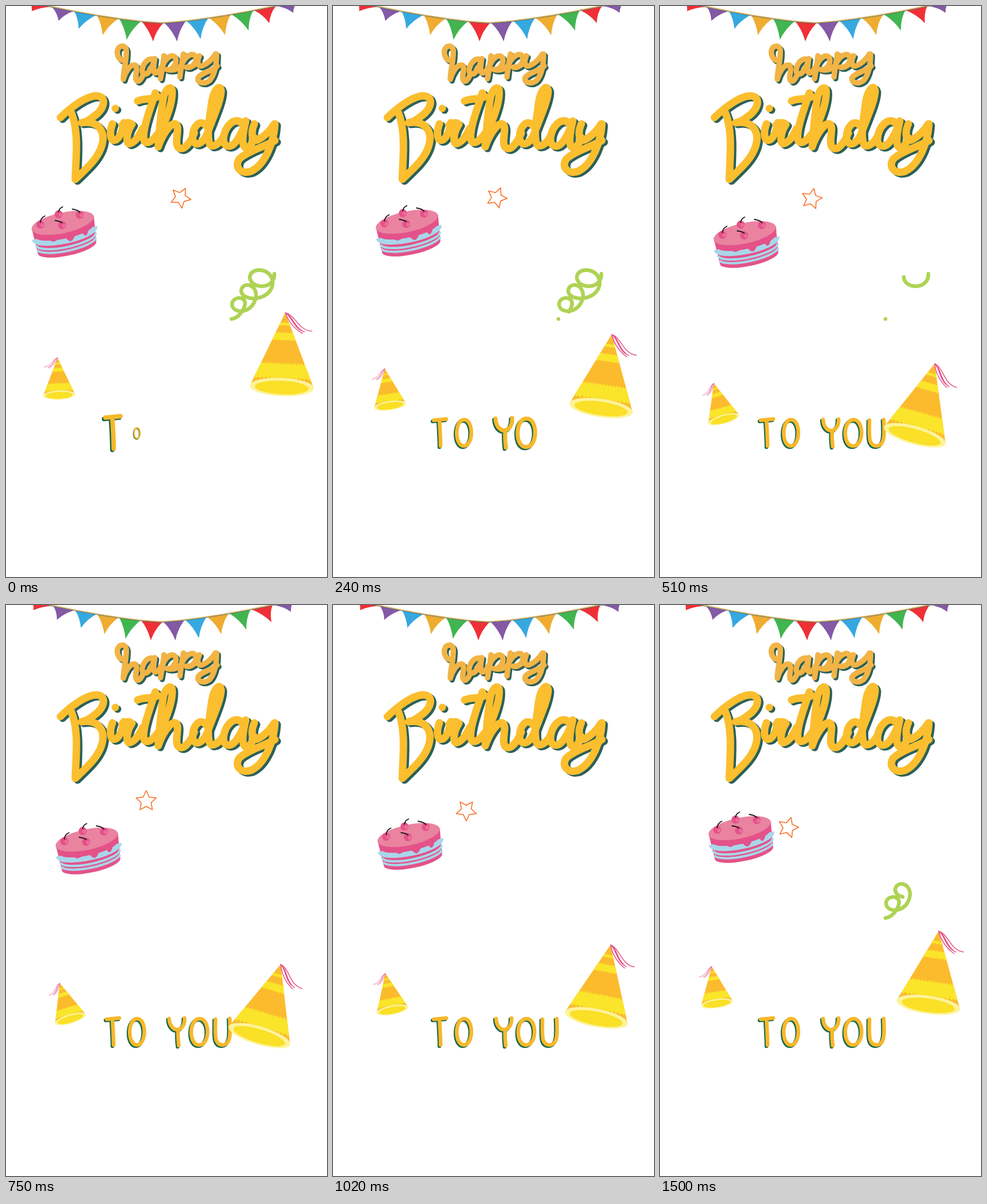
Write an HTML page that moves like this. It is 561 px wide and 998 px high and loops after 1530 ms.

```html
<!DOCTYPE html>
<html lang="en">
<head>
<meta charset="utf-8">
<title>Birthday card</title>
<style>
html, body { margin: 0; width: 100%; height: 100%; overflow: hidden; background: #fff; }
svg { display: block; width: 100vw; height: 100vh; }
.ink { fill: none; stroke-linecap: round; stroke-linejoin: round; }
</style>
</head>
<body>
<svg viewBox="0 0 561 998" role="img" aria-label="Happy Birthday to you">
  <defs>
    <path id="happy" d="M207 95C198 96 193 86 195 77C198 68 208 68 210 76C212 90 205 112 205 128C208 117 216 103 224 103C234 104 222 127 229 131C233 133 237 126 240 120
      M258 95C252 88 240 98 238 111C237 122 246 121 252 112C256 105 260 95 260 92C258 104 256 118 262 117C268 115 271 108 274 103
      M276 87C275 100 272 116 270 127M274 104C278 92 290 82 296 90C300 100 290 114 281 111C292 114 301 110 307 103
      M310 84C308 98 305 112 304 124M308 100C314 88 326 80 331 88C335 98 325 110 315 107C324 108 331 102 335 97
      M338 87C333 98 335 108 344 104C353 100 361 92 366 84M368 84C368 100 366 118 356 130C348 138 332 134 336 125C342 116 360 114 369 105"/>
    <path id="birthday" d="M95 195C112 178 140 157 158 157C178 158 172 182 152 194C146 199 138 203 132 204C160 199 174 218 168 242C162 266 140 285 121 303M114 186C128 220 122 265 121 303
      M186 206C180 222 182 238 192 234C200 230 204 214 206 204M191 179L191 179
      M203 208C208 203 216 203 220 207C210 222 208 245 218 240C228 236 234 224 239 214
      M261 152C252 180 238 215 241 234C245 244 257 236 266 222M230 166C242 160 256 165 265 158
      M268 222C280 200 293 165 290 146C286 138 278 148 275 160C270 190 268 220 266 246C272 228 286 204 296 206C306 210 292 240 302 248C312 254 324 235 329 222
      M350 210C340 196 326 210 326 230C328 250 346 240 352 222C362 195 376 165 376 148C374 136 364 145 360 165C356 195 350 225 356 241C360 250 374 240 380 228
      M412 205C400 192 382 210 380 232C380 250 396 248 404 234C412 222 416 212 419 201C414 222 410 246 420 248C427 247 431 238 434 230
      M434 206C427 222 430 238 440 234C452 228 462 217 469 206M470 206C468 240 452 278 428 289C410 295 398 281 408 267C425 252 455 245 470 235"/>
    <g id="hat">
      <path d="M0 0L55 128A55 16 0 0 1 -55 128Z" fill="#fbbb2d"/>
      <g id="bands" fill="#fae52a"></g>
      <ellipse cy="130" rx="56" ry="16" fill="#fdf39b"/>
      <ellipse cy="131" rx="47" ry="12" fill="#fae026"/>
      <g class="ink" stroke="#e4558b" stroke-width="1.5">
        <path d="M0 0C18 3 24 30 48 30M0 0C12 6 16 28 35 32M0 0C5 12 14 26 32 35M0 0C14 6 16 22 29 29"/>
      </g>
    </g>
  </defs>

  <g id="bunting"></g>
  <use href="#happy" class="ink" x="3" y="3" stroke="#2b6159" stroke-width="9.5"/>
  <use href="#happy" class="ink" stroke="#f2b445" stroke-width="9.5"/>
  <use href="#birthday" class="ink" x="4" y="3" stroke="#2b6159" stroke-width="13"/>
  <use href="#birthday" class="ink" stroke="#fbbe2e" stroke-width="13"/>

  <g id="cake">
    <g transform="rotate(-12)">
      <path d="M-53.5 -16L-52 28A52 14 0 0 0 52 28L57 -16Z" fill="#e45289"/>
      <g fill="none" stroke="#a9d6ea">
        <path d="M-53 2A53 14 0 0 0 55 2" stroke-width="9"/>
        <path d="M-52 13A53 14 0 0 0 54 13M-52 21.5A53 14 0 0 0 53 21.5" stroke-width="4"/>
      </g>
      <path d="M-53 -4Q-47 4 -40 3T-27 9T-12 10T3 14T18 10T32 9T45 1T56 -6L57 -16H-53Z" fill="#e45289"/>
      <ellipse cx="1.5" cy="-16" rx="55.5" ry="18" fill="#e9839f"/>
    </g>
    <g id="cherries"></g>
  </g>

  <path id="star" class="ink" stroke="#f9681c" stroke-width="1.5"/>
  <path id="curl" class="ink" pathLength="100" stroke="#aed354" stroke-width="6.5" d="M394 547C406 546 417 531 418 519C416 506 395 508 395 522C397 540 434 538 437 506C437 484 412 482 411 498C413 518 462 516 466 486C468 458 428 454 426 474C428 496 470 496 469 468"/>
  <g id="words" class="ink" stroke-width="6.5"></g>
  <use id="smallHat" href="#hat"/>
  <use id="bigHat" href="#hat"/>
</svg>
<script>
const LOOP = 1530, STEP = 30;
const KEYS = [0, 240, 510, 750, 1020, 1260, 1500];
const $ = id => document.getElementById(id);

function add(parent, tag, attrs) {
  const el = document.createElementNS('http://www.w3.org/2000/svg', tag);
  for (const k in attrs) el.setAttribute(k, attrs[k]);
  return parent.appendChild(el);
}

// Smooth curve through the values at KEYS
function curve(v, t) {
  let i = 0;
  while (i < KEYS.length - 2 && t >= KEYS[i + 1]) i++;
  const slope = j => {
    const a = Math.max(j - 1, 0), b = Math.min(j + 1, KEYS.length - 1);
    return (v[b] - v[a]) / (KEYS[b] - KEYS[a]);
  };
  const h = KEYS[i + 1] - KEYS[i], u = (t - KEYS[i]) / h, w = 1 - u;
  return v[i] * (1 + 2 * u) * w * w + v[i + 1] * u * u * (3 - 2 * u)
    + h * u * w * (slope(i) * w - slope(i + 1) * u);
}

const inOut = u => {
  u = Math.min(1, Math.max(0, u));
  return u < .5 ? 4 * u ** 3 : 1 - 4 * (1 - u) ** 3;
};

const MOVES = {
  cakeX: [101, 131, 150, 143, 134, 136, 141],
  cakeY: [395, 393, 413, 426, 418, 415, 406],
  starX: [305, 286, 265, 245, 233, 228, 224],
  starY: [335, 335, 337, 343, 359, 374, 389],
  starTurn: [-62, -68, -77, -90, -126, -140, -146],
  hatX: [488, 487, 480, 480, 485, 488, 487],
  hatY: [536, 574, 625, 628, 594, 568, 570],
  hatTurn: [2.6, 8.2, 15.5, 16.6, 11, 7.8, 8]
};

// Hat stripes with zigzag edges: [top, bottom, teeth, depth]
for (const [top, bottom, n, d] of [[17, 22, 3, 1], [34, 47, 7, 2], [87, 113, 14, 4]]) {
  const edge = y => Array.from({ length: 2 * n + 1 }, (_, i) => {
    const yy = y + (i % 2 ? d : 0);
    return [(i / n - 1) * yy * .43, yy];
  });
  add($('bands'), 'path', { d: 'M' + [...edge(top), ...edge(bottom).reverse()].join('L') + 'Z' });
}

// Cherry position and stem end
for (const [x, y, sx, sy] of [[-9, -31, 7, -13], [28, -30, -13, -10], [-41, -13, 8, -15], [-3, -12, -12, -8]]) {
  const g = add($('cherries'), 'g', { transform: `translate(${x} ${y})` });
  add(g, 'circle', { r: 7, fill: '#e45289' });
  add(g, 'circle', { cx: 3, cy: 1, r: 3, fill: '#ee6f9c' });
  add(g, 'path', { class: 'ink', d: `M0 -4Q${sx * .1} ${sy * .8} ${sx} ${sy}`, stroke: '#17131a', 'stroke-width': 1.8 });
}

const COLOURS = ['#ef3036', '#8459a5', '#36a8e0', '#efac30', '#41b550'];
const TIP_X = [45, 92, 127, 169, 211, 257, 299, 340, 383, 424, 460, 502];
const TIP_Y = [9, 26, 40, 51, 59, 62, 62, 58, 51, 43, 30, 12];
const SWAY = [3, -3, 4, 3, -2, -4, -3, -3, -7, -4, 4, -4];
const ropeY = x => 30 - 21 * (Math.abs(x - 272) / 156) ** 1.4;
const flags = TIP_X.map((_, i) => add($('bunting'), 'path', { fill: COLOURS[i % 5] }));
const rope = add($('bunting'), 'path', { class: 'ink', stroke: '#d9a94c', 'stroke-width': 1.5 });
const ropeShade = add($('bunting'), 'path', { class: 'ink', stroke: '#4c6c68', 'stroke-width': .8 });

function drawBunting(t) {
  const w = (1 - Math.cos(2 * Math.PI * t / LOOP)) / 2;
  const place = x => 275 + (x - 275) * (1 - .02 * w) - 1.5 * w;
  flags.forEach((flag, i) => {
    const a = 41 + 39.3 * i, b = a + 37;
    const ax = place(a), bx = place(b), ay = ropeY(a), by = ropeY(b);
    const x = TIP_X[i] + SWAY[i] * w, y = TIP_Y[i];
    flag.setAttribute('d', `M${ax} ${ay}L${bx} ${by}Q${(bx + x) / 2 - 4} ${(by + y) / 2 - 2} ${x} ${y}`
      + `Q${(ax + x) / 2 + 3} ${(ay + y) / 2 - 3} ${ax} ${ay}Z`);
  });
  const line = dy => 'M' + Array.from({ length: 45 }, (_, i) => {
    const x = 52 + i * 10;
    return [place(x), ropeY(x) + dy];
  }).join('L');
  rope.setAttribute('d', line(-1));
  ropeShade.setAttribute('d', line(.4));
}

// Letter outline, centre x, start time
const letters = [
  ['M176 724L198 722M186 724C187 740 188 755 188 769', 187, -120],
  ['M229 723C212 724 212 769 229 769C246 768 246 723 229 723', 229, -30],
  ['M285 723C286 738 295 743 300 742C308 741 313 732 312 722M301 742C300 752 301 762 302 770', 299, 60],
  ['M338 723C319 724 319 770 338 769C357 768 357 723 338 723', 338, 150],
  ['M366 724C366 750 363 769 379 769C394 768 392 745 391 723', 379, 240]
].map(([d, x, start]) => {
  const g = add($('words'), 'g', {});
  add(g, 'path', { d, stroke: '#176847', transform: 'translate(-2 2)' });
  add(g, 'path', { d, stroke: '#f7b82b' });
  return { g, x, start };
});

// Pop-in with overshoot: [age, scale]
const POP = [[0, 0], [30, .4], [90, 1.08], [120, 1.2], [170, 1.1], [220, 1]];
function pop(age) {
  if (age <= 0) return 0;
  const i = POP.findIndex(p => p[0] > age);
  if (i < 0) return 1;
  const [a, p] = POP[i - 1], [b, q] = POP[i];
  return p + (q - p) * (age - a) / (b - a);
}

function starPath(cx, cy, turn) {
  return 'M' + Array.from({ length: 10 }, (_, i) => {
    const a = (turn + i * 36) * Math.PI / 180, r = i % 2 ? 9 : 18.5;
    return [cx + r * Math.cos(a), cy + r * Math.sin(a)];
  }).join('L') + 'Z';
}

function draw(t) {
  const at = name => curve(MOVES[name], t);
  drawBunting(t);
  $('cake').setAttribute('transform', `translate(${at('cakeX')} ${at('cakeY')})`);
  $('star').setAttribute('d', starPath(at('starX'), at('starY'), at('starTurn')));

  const x = at('hatX'), y = at('hatY'), turn = at('hatTurn');
  $('bigHat').setAttribute('transform', `translate(${x} ${y}) rotate(${turn})`);
  $('smallHat').setAttribute('transform',
    `translate(${90 - (x - 488) / 2} ${615 + (y - 536) / 2}) scale(-.5 .5) rotate(${turn})`);

  const from = t < 1000 ? 100 * inOut((t - 75) / 668) : 0;
  const to = t < 1000 ? 100 : 100 * inOut((t - 1160) / 668);
  $('curl').style.display = to - from > .05 ? '' : 'none';
  $('curl').setAttribute('stroke-dasharray', `0 ${from} ${to - from} 200`);
  // Thin start of the ribbon
  $('curl').setAttribute('stroke-width', to < 5 ? 3 : 6.5);

  for (const { g, x, start } of letters) {
    const s = pop(t - start);
    g.style.display = s ? '' : 'none';
    g.setAttribute('transform', `translate(${x} 747) scale(${s}) translate(${-x} -747)`);
  }
}

const begin = performance.now();
function tick() {
  const t = Math.max(0, performance.now() - begin) % LOOP;
  draw(Math.floor(t / STEP) * STEP);
  requestAnimationFrame(tick);
}
tick();
</script>
</body>
</html>
```
